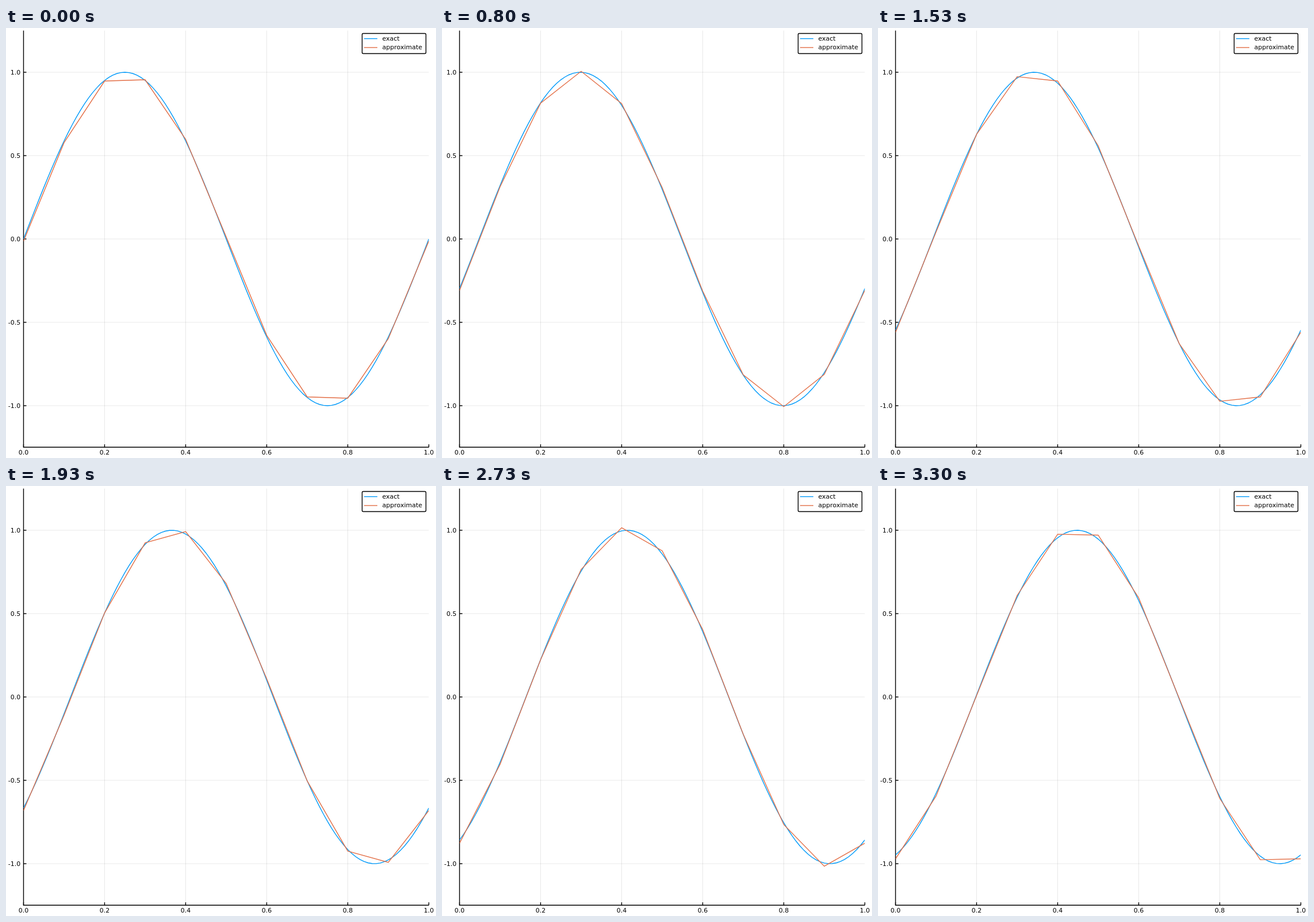
These frames come from a looping animation (748 by 748 pixels, 3330 ms). An HTML page with a canvas:

```html
<!DOCTYPE html>
<html lang="en">
<head>
<meta charset="utf-8">
<title>Travelling wave</title>
<style>
  html, body { margin: 0; width: 100%; height: 100%; overflow: hidden; background: #fff; }
  canvas { display: block; width: 748px; height: 748px; }
</style>
</head>
<body>
<canvas id="plot" width="748" height="748"></canvas>
<script>
const ctx = document.getElementById('plot').getContext('2d');
const BLUE = '#009afa', RED = '#e36f47', BLACK = '#000';
const LEFT = 30.5, RIGHT = 735.5, TOP = 4.5, BOTTOM = 729.2;
const LOOP = 3330, STEPS = 100;
const STEP_SHIFT = 0.002;      // exact wave travel per step
const STEP_PHASE = 0.01248;    // numerical wave lags slightly
const STEP_GROWTH = 0.000233;  // and slowly gains amplitude

const px = x => LEFT + x * (RIGHT - LEFT);
const py = y => 367 - y * 290;

function line(points, color, width) {
  ctx.beginPath();
  points.forEach(([x, y]) => ctx.lineTo(x, y));
  ctx.strokeStyle = color;
  ctx.lineWidth = width;
  ctx.stroke();
}

function text(str, x, y, align) {
  ctx.textAlign = align;
  ctx.fillStyle = BLACK;
  ctx.fillText(str, x, y);
}

function curve(fn, segments, color) {
  const points = Array.from({ length: segments + 1 }, (_, i) => {
    const x = i / segments;
    return [px(x), py(fn(x))];
  });
  line(points, color, 1.4);
}

function drawAxes() {
  const xs = [0, 0.2, 0.4, 0.6, 0.8, 1];
  const ys = [1, 0.5, 0, -0.5, -1];
  const grid = 'rgba(0,0,0,0.09)';
  xs.slice(1, -1).forEach(x => line([[px(x), TOP], [px(x), BOTTOM]], grid, 1));
  ys.forEach(y => line([[LEFT, py(y)], [RIGHT, py(y)]], grid, 1));

  line([[LEFT, TOP], [LEFT, BOTTOM], [RIGHT, BOTTOM]], BLACK, 1.4);
  xs.forEach(x => {
    line([[px(x), BOTTOM], [px(x), BOTTOM - 5]], BLACK, 1.4);
    text(x.toFixed(1), px(x), 742, 'center');
  });
  ys.forEach(y => {
    line([[LEFT, py(y)], [LEFT + 5, py(y)]], BLACK, 1.4);
    text(y.toFixed(1), 25.3, py(y) + 4, 'right');
  });
}

function drawLegend() {
  ctx.beginPath();
  ctx.roundRect(619.5, 9.5, 111, 35, 2);
  ctx.fillStyle = '#fff';
  ctx.fill();
  ctx.strokeStyle = BLACK;
  ctx.lineWidth = 1.4;
  ctx.stroke();
  line([[623, 18.5], [646, 18.5]], BLUE, 1.4);
  line([[623, 34], [646, 34]], RED, 1.4);
  text('exact', 654.5, 22, 'left');
  text('approximate', 654.5, 37, 'left');
}

function draw(step) {
  ctx.fillStyle = '#fff';
  ctx.fillRect(0, 0, 748, 748);
  ctx.font = '11px "DejaVu Sans", sans-serif';
  drawAxes();

  const n = step + 1;
  const amplitude = Math.exp(STEP_GROWTH * n);
  ctx.save();
  ctx.beginPath();
  ctx.rect(LEFT, TOP, RIGHT - LEFT, BOTTOM - TOP);
  ctx.clip();
  curve(x => Math.sin(2 * Math.PI * (x - STEP_SHIFT * step)), 100, BLUE);
  curve(x => amplitude * Math.sin(2 * Math.PI * x - STEP_PHASE * n), 10, RED);
  ctx.restore();

  drawLegend();
}

// Step k begins at k/30 s, rounded to 10 ms.
function stepAt(ms) {
  const k = Math.floor((ms + 5) * 0.03);
  return Math.min(k, STEPS - 1);
}

const start = performance.now();
function tick() {
  draw(stepAt((performance.now() - start) % LOOP));
  requestAnimationFrame(tick);
}
tick();
</script>
</body>
</html>
```
